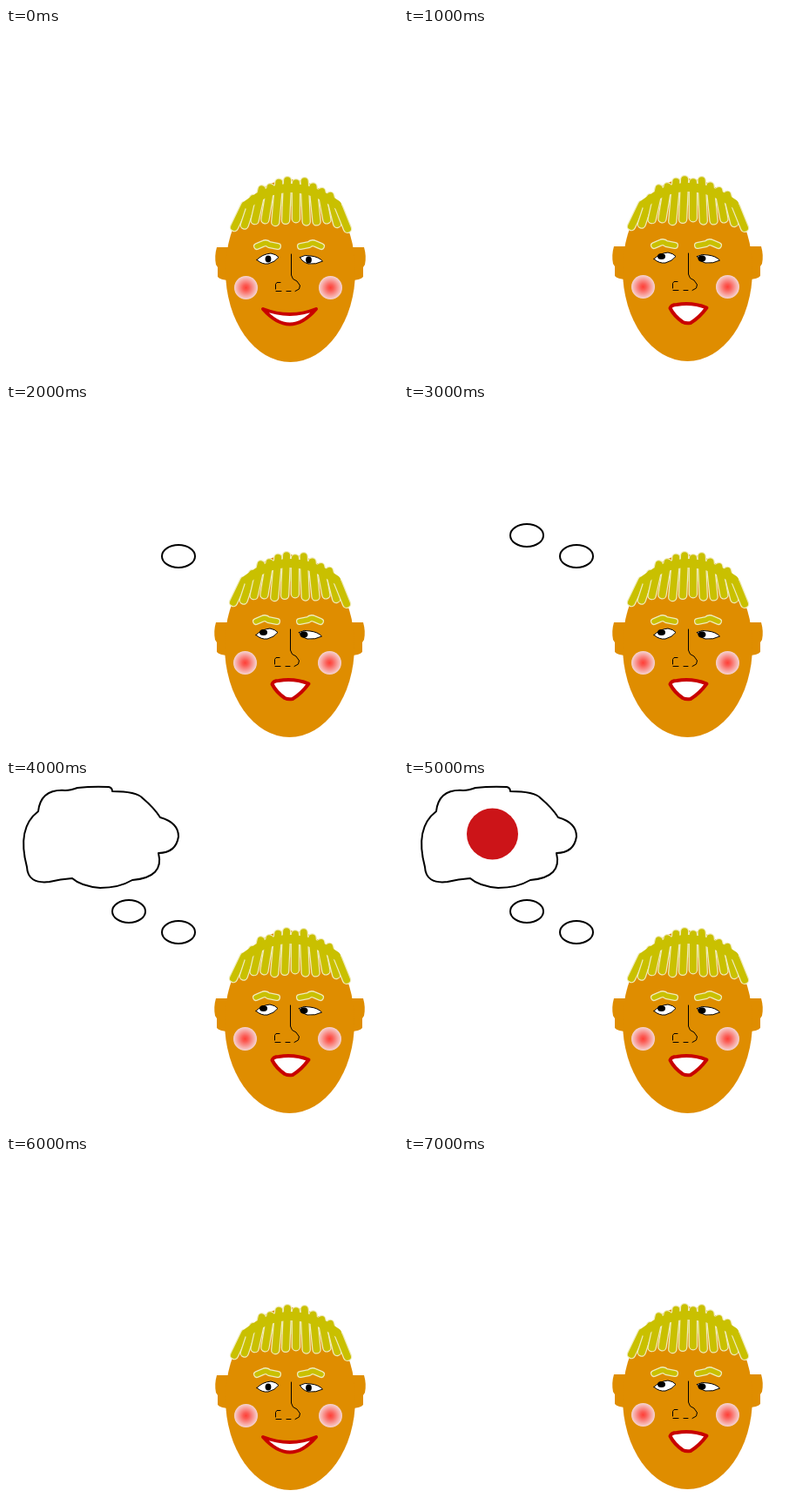
These frames come from a looping animation (450 by 400 pixels, 8000 ms). An HTML page with a canvas:

```html
<!DOCTYPE html>
<html lang="en">
<head>
<meta charset="utf-8">
<title>Daydream</title>
<style>
html, body { margin: 0; width: 100%; height: 100%; overflow: hidden; background: #fff; }
canvas { display: block; }
</style>
</head>
<body>
<canvas id="stage" width="450" height="400"></canvas>
<script>
const ctx = document.getElementById('stage').getContext('2d');
const SKIN = '#df8d00', HAIR = '#c9c000', HALO = '#f0ebbc', LIP = '#c80000';
const STEP = 1000, LOOP = 8 * STEP, STRANDS = 12;

function shape(path, fill, stroke, width = 1) {
  const outline = new Path2D(path);
  if (fill) { ctx.fillStyle = fill; ctx.fill(outline); }
  if (stroke) { ctx.strokeStyle = stroke; ctx.lineWidth = width; ctx.stroke(outline); }
}

function ellipse(x, y, rx, ry, fill, stroke, width) {
  const outline = new Path2D();
  outline.ellipse(x, y, rx, ry, 0, 0, Math.PI * 2);
  shape(outline, fill, stroke, width);
}

// Draws a part and its reflection about a vertical axis.
function mirrored(axis, drawPart) {
  drawPart();
  ctx.save();
  ctx.translate(2 * axis, 0);
  ctx.scale(-1, 1);
  drawPart();
  ctx.restore();
}

function hairStroke(path, width) {
  shape(path, null, HALO, width + 2.5);
  shape(path, null, HAIR, width);
}

function hair() {
  shape('M274 203 Q325 160 382 203Z', HAIR, HAIR, 4);
  for (let i = 0; i < STRANDS; i++) {
    const u = i / (STRANDS - 1) * 2 - 1;
    const rootX = 328 + 54 * u;
    const rootY = 176 + 28 * u * u + 2 * Math.sin(i * 2.4);
    const tipX = 327 + 65 * u;
    const tipY = 221 + 8 * u ** 4 + 2 * Math.sin(i * 1.9);
    hairStroke(`M${rootX} ${rootY} L${tipX} ${tipY}`, 8);
  }
  shape('M277 203 Q325 165 380 203', null, HAIR, 10);
}

function brow() {
  hairStroke('M288 251 L295 248 Q299 246 302 249 L312 251', 5.5);
}

function ear() {
  shape('M258 252 H242 Q239 262 241 272 L243 275 V286 Q246 290 258 290Z', SKIN);
}

function eyes(looking) {
  shape('M288 266.5 Q294 260 304 259 Q310 260 313 263.5 Q309 269 301 271 Q294 272 288 266.5Z', '#fff', '#000');
  shape('M337.5 263.5 Q343 260 350 262 Q359 263 363.5 268 Q356 272 347 271 Q340 269 337.5 263.5Z', '#fff', '#000');
  if (looking) {
    ellipse(296.5, 263.5, 4.5, 3.6, '#000');
    ellipse(343, 266, 4.5, 3.8, '#000');
  } else {
    ellipse(301, 265.5, 3.4, 4, '#000');
    ellipse(347.5, 266.5, 3.4, 4, '#000');
  }
}

function nose() {
  shape('M327.5 260 V284 L329.5 288.5 L334 291 L337.5 296 L336.5 300 L332 302.5', null, '#000');
  shape('M315 292.5 H311 L309.5 294.5 V300 M310 302.5 H316 M322 302.5 H327', null, '#000');
}

function cheek() {
  const x = 275.5, y = 298.5, r = 13.5;
  const glow = ctx.createRadialGradient(x, y, 0, x, y, r);
  glow.addColorStop(0, '#ff4038');
  glow.addColorStop(0.25, '#fb5c55');
  glow.addColorStop(1, '#f5d5d3');
  ellipse(x, y, r, r, glow);
}

function mouth(looking) {
  const lips = looking
    ? 'M306.5 323 Q308 319 314 319 Q332 316 348.5 322.5 Q340 334 330 340 Q325 341 321 339 Q311 332 306.5 323Z'
    : 'M295 323 Q326 335 356 323 Q326 358 295 323Z';
  shape(lips, '#fff', LIP, 4);
}

function head(looking) {
  ctx.save();
  if (looking) ctx.translate(-1, -1);
  mirrored(326.5, ear);
  ellipse(326.5, 279, 74.5, 105, SKIN);
  hair();
  mirrored(325, brow);
  eyes(looking);
  nose();
  mirrored(324, cheek);
  mouth(looking);
  ctx.restore();
}

function bubble(x, y) {
  ellipse(x, y, 19, 13, '#fff', '#000', 2);
}

function cloud() {
  shape(`M37 36 Q40 10 68 12 Q74 12 82 9 Q100 7 118 8 Q122 9 122 13
    Q150 13 157 21 Q170 32 177 43 Q198 49 198 65 Q195 84 175 84
    Q182 112 145 115 Q130 124 108 124 Q86 122 76 113 Q62 114 50 117
    Q25 120 24 100 Q12 55 37 36Z`, '#fff', '#000', 2);
}

function draw(time) {
  const step = Math.floor(time / STEP);
  const smiling = step === 0 || step === 6;
  ctx.fillStyle = '#fff';
  ctx.fillRect(0, 0, 450, 400);
  ctx.lineCap = ctx.lineJoin = 'round';
  head(!smiling);
  if (step >= 6) return;
  if (step >= 2) bubble(198, 175);
  if (step >= 3) bubble(141, 151);
  if (step >= 4) cloud();
  if (step >= 5) ellipse(101.5, 62, 29.5, 29.5, '#cc1418');
}

const start = performance.now();
function tick() {
  draw((performance.now() - start) % LOOP);
  requestAnimationFrame(tick);
}
tick();
</script>
</body>
</html>
```
